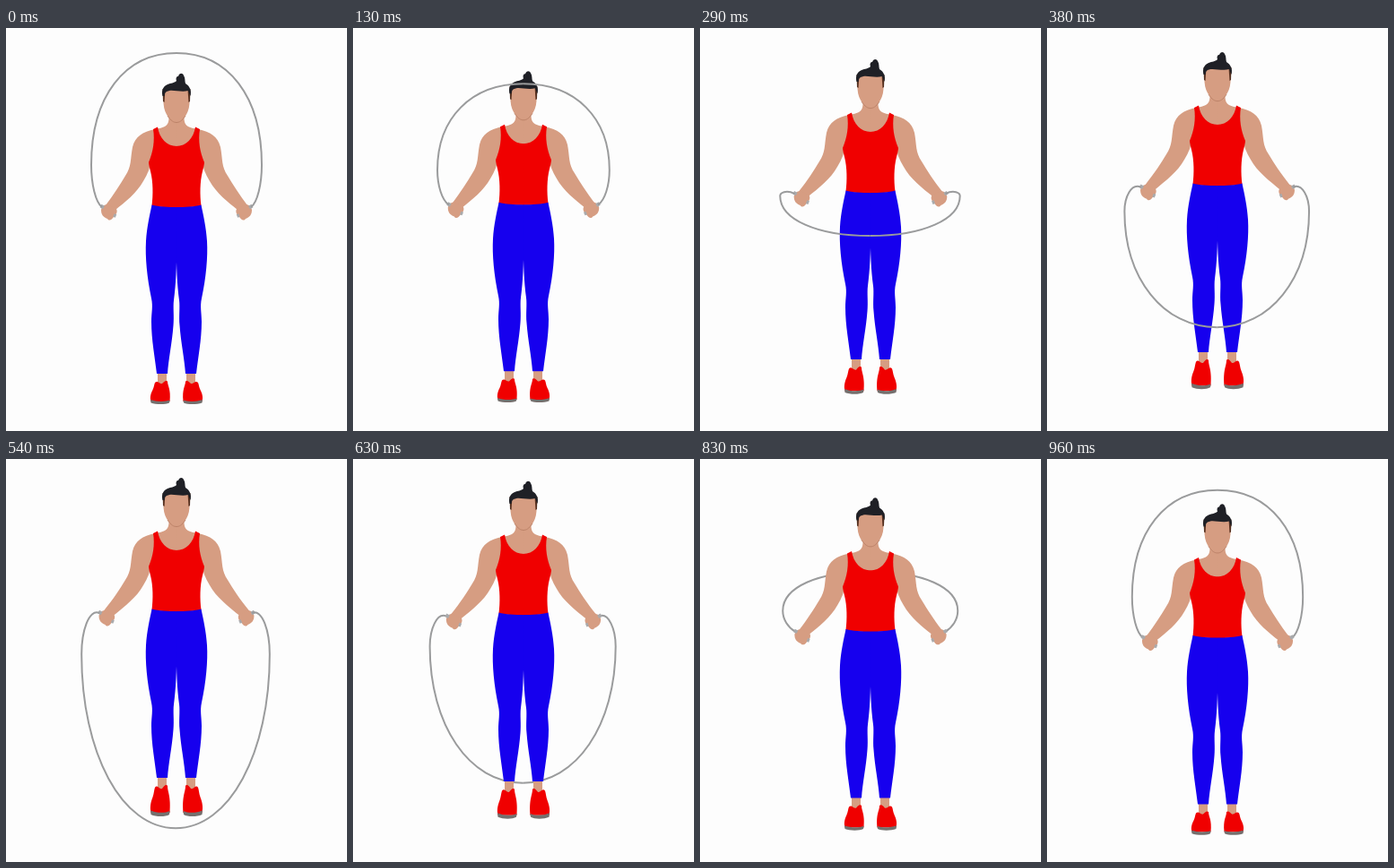
An HTML page with a canvas for the animation above (1000 ms loop, 380x450 px).

```html
<!DOCTYPE html>
<html lang="en">
<head>
<meta charset="utf-8">
<title>Jump rope</title>
<style>
html, body { margin: 0; width: 100%; height: 100%; overflow: hidden; background: #fdfdfd; }
canvas { display: block; }
</style>
</head>
<body>
<canvas id="stage" width="380" height="450"></canvas>
<script>
const ctx = document.getElementById('stage').getContext('2d');
const STEPS = 24, MID = 190;
const PAPER = '#fdfdfd', SKIN = '#d69d82', SHADE = '#bd8369', HAIR = '#1f2026', TEMPLE = '#55301f',
      RED = '#f00000', BLUE = '#1600ee', SOLE = '#74706e', ROPE = '#9a9b9c', GRIP = '#a9aaac';

// Left halves of the figure; each is mirrored around MID.
const shirt = new Path2D('M164 113 L169 110.5 C171 123 179 132 190.5 132 L190.5 200.5 C180 200.5 170 200 162.5 198.5 C164 186 164 172 161 160 C160 156 159 152 159 150 C164 138 166 126 164 113Z');
const leg = new Path2D('M162.5 197.5 C170 199.5 180 200 190.5 200 L190.3 245 C190 268 189.500 285 187 304 C186 312 187.500 322 186.500 332 C185 352 181 370 180 386 L168 386 C166 368 162 348 162 328 C162 318 164 311 162 302 C157 278 155 256 156 238 C157 222 160 210 162.5 197.5Z');
const ankle = new Path2D('M169 385 L179 385 L179 400 L169 400Z');
const shoe = new Path2D('M166 396 C169 393 171 398 174 397 C176 395 178 393 180 394.500 C180 400 184 403 182.500 417 L161.500 417 C160 412 161.500 408 163.500 404 C165 401 165 398 166 396Z');
const sole = new Path2D('M161 415 C168 417.500 177 417.500 182.500 415.500 L182 418.500 C178 420.500 167 420.500 161.500 418.500Z');
const hand = new Path2D('M106 203 C107 199 110 197 113 197 L123 202 C125 206 122 209 120 211 C118 214 115 216 113 213 C108 211 106 208 106 203Z');
const grip = new Path2D('M105.500 198.500 L109 200.500 M120 209 L122.500 210');
const face = new Path2D('M175.500 68 L175.500 84 C176 91 178 96 181 99.500 C184 103.500 187 105 190 105 C193 105 196 103.500 199 99.500 C202 96 204 91 204.500 84 L204.500 68Z');
const jaw = new Path2D('M180 98 C184 104 187 105.500 190 105.500 C193 105.500 196 104 200 98');
const temple = new Path2D('M174.500 68 L177.500 68 L176.500 83 L175 82Z');
const hair = new Path2D('M174.500 76 C173 70 175 65 180 63 C184 61 187 62 190 59 C189 56 190 54 192 54 C193 50 197 50 198 53 C200 56 199 59 200 62 C205 65 207 70 205.500 76 L203 70 C196 72 187 69 182 70 C178 71 177 72 176.500 76Z');

function fill(path, color) {
  ctx.fillStyle = color;
  ctx.fill(path);
}

function stroke(path, color, width) {
  ctx.strokeStyle = color;
  ctx.lineWidth = width;
  ctx.stroke(path);
}

function both(draw, mid = MID) {
  for (const side of [1, -1]) {
    ctx.save();
    ctx.translate(mid, 0);
    ctx.scale(side, 1);
    ctx.translate(-mid, 0);
    draw();
    ctx.restore();
  }
}

// 0 = standing with rope overhead, 1 = top of the jump; the rise starts late.
function swing(step) {
  const x = step / 12;
  const lag = x < 1 ? 0.84 * (1 - Math.abs(2 * x - 1) ** 2.6) : 0;
  return (1 - Math.cos((step - lag) / STEPS * 2 * Math.PI)) / 2;
}

function drawRope(c) {
  const mid = 190 - c, end = 28 + 391 * c;
  const wx = 95 - 11 * c, wy = 153 + 66 * c;
  const gx = 107 - 3 * c, gy = 200 - 28.5 * c;
  const k = 0.61 - 0.04 * c;
  const half = new Path2D();
  half.moveTo(gx, gy);
  half.bezierCurveTo(gx - 7 - 5 * c, gy - 5, wx, wy + (gy - 4 - wy) / 2, wx, wy);
  half.bezierCurveTo(wx, wy + k * (end - wy), mid - k * (mid - wx), end, mid, end);
  both(() => stroke(half, ROPE, 2), mid);
}

function drawShoe(c) {
  ctx.save();
  ctx.translate(0, 394);
  ctx.scale(1, 1 + 0.35 * c);
  ctx.translate(0, -394);
  fill(shoe, RED);
  fill(sole, SOLE);
  ctx.restore();
}

function drawBody(c) {
  const hx = -2.5 * c, hy = 2 * c;
  const arm = new Path2D(`M181.5 98 C182 110 177 111 166 113 C152 116 144 121 141 133
    C138.5 146 140 155 133 165 C127 175 120 186 ${111 + hx} ${198 + hy} L${122 + hx} ${203 + hy}
    C132 195 146 184 153 171 C158 163 161 155 162 147 L190.5 140 L190.5 98Z`);
  ctx.save();
  ctx.translate(0, -30.5 * c);
  both(() => {
    fill(arm, SKIN);
    fill(ankle, SKIN);
    drawShoe(c);
  });
  both(() => {
    fill(shirt, RED);
    fill(leg, BLUE);
    ctx.translate(hx, hy);
    fill(hand, SKIN);
    stroke(grip, GRIP, 4);
  });
  fill(face, SKIN);
  stroke(jaw, SHADE, 1);
  both(() => fill(temple, TEMPLE));
  fill(hair, HAIR);
  ctx.restore();
}

function render(now) {
  // Steps of 1/24 s, rounded to hundredths of a second.
  const tick = Math.floor(now % 1000 / 10);
  const step = Math.ceil(STEPS * (tick + 0.5) / 100) - 1;
  const c = swing(step);
  const front = step <= 13;
  ctx.fillStyle = PAPER;
  ctx.fillRect(0, 0, 380, 450);
  if (!front) drawRope(c);
  drawBody(c);
  if (front) drawRope(c);
}

const start = performance.now();
function loop() {
  render(performance.now() - start);
  requestAnimationFrame(loop);
}
loop();
</script>
</body>
</html>
```
